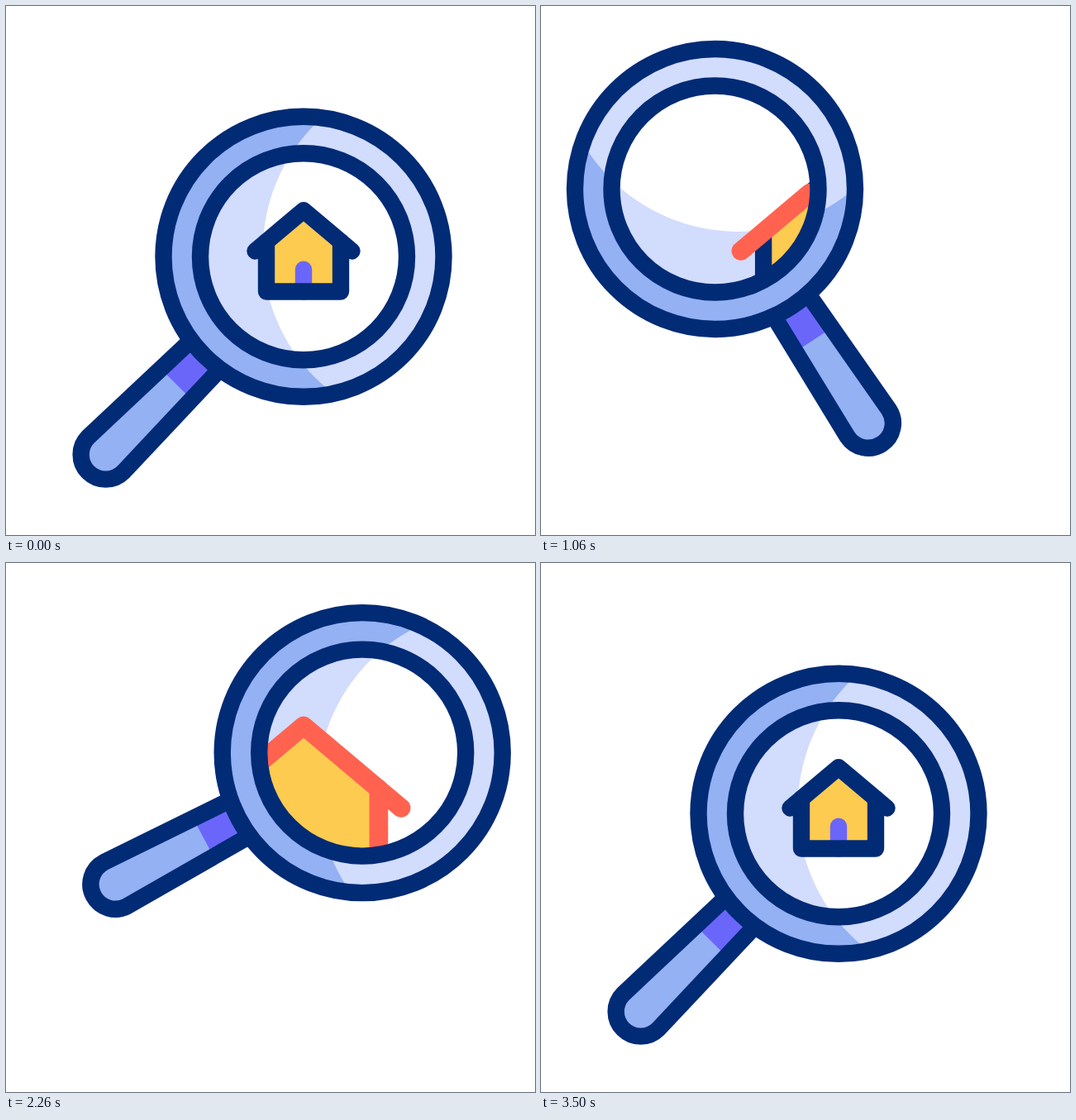
Recreate the animation shown at these times as an HTML page. Size 640x640 px, loop 3600 ms.

```html
<!DOCTYPE html>
<html lang="en">
<head>
<meta charset="utf-8">
<title>House search</title>
<style>
  html, body { margin: 0; width: 100%; height: 100%; overflow: hidden; background: #fff; }
  svg { display: block; width: 100vw; height: 100vh; }
  .line { fill: none; stroke: #022b76; stroke-width: 20.4; stroke-linecap: round; stroke-linejoin: round; }
  .hot .line { stroke: #ff6350; stroke-width: 22.7; }
  .mid { fill: #93b1f3; }
  .pale { fill: #d2dcfd; }
  .violet { fill: #6b66fa; }
</style>
</head>
<body>
<svg viewBox="0 0 640 640">
  <defs>
    <clipPath id="lens"><circle id="hole" r="120"/></clipPath>
    <clipPath id="shine"><circle cx="168.2" cy="-7" r="217.5"/></clipPath>
    <path class="route" d="M360 303.3C340 236.3 260 192.3 210.5 221.5"/>
    <path class="route" d="M210.5 221.5C280.5 158 380.5 247 441 219.5"/>
    <path class="route" d="M441 219.5L360 303.3"/>
  </defs>

  <g id="glass">
    <g transform="rotate(135)">
      <path class="mid" d="M165 -24.6L338.5 -30A30 30 0 0 1 338.5 30L165 24.6Z"/>
      <path class="violet" d="M165 -24.6L218 -26.2V26.2L165 24.6Z"/>
      <path class="line" d="M165 -24.6L338.5 -30A30 30 0 0 1 338.5 30L165 24.6"/>
    </g>
    <circle class="mid" r="170"/>
    <circle class="pale" r="170" clip-path="url(#shine)"/>
    <circle class="pale" r="125"/>
    <circle fill="#fff" r="125" clip-path="url(#shine)"/>
  </g>

  <g clip-path="url(#lens)">
    <g transform="translate(360 296.5)">
      <path class="body" fill="#fccb50"/>
      <path class="door line" style="stroke:#6b66fa"/>
      <path class="walls line"/>
      <path class="roof line"/>
      <g class="hot" id="hot">
        <path class="door line" pathLength="1"/>
        <path class="walls line" pathLength="1"/>
        <path class="roof line" pathLength="1"/>
      </g>
    </g>
  </g>

  <g id="rims">
    <circle class="line" r="169.5"/>
    <circle class="line" r="125"/>
  </g>
</svg>

<script>
const LOOP = 3600;
const $ = id => document.getElementById(id);
const all = sel => [...document.querySelectorAll(sel)];

const clamp = v => Math.min(1, Math.max(0, v));
const span = (t, a, b) => clamp((t - a) / (b - a));
const smooth = s => s * s * (3 - 2 * s);
const sine = s => (1 - Math.cos(Math.PI * s)) / 2;

// cubic-bezier(.33, 0, .55, 1)
function glide(s) {
  let lo = 0, hi = 1;
  for (let i = 0; i < 24; i++) {
    const u = (lo + hi) / 2, v = 1 - u;
    if (0.99 * u * v * v + 1.65 * u * u * v + u * u * u < s) lo = u; else hi = u;
  }
  return smooth(lo);
}

const routes = all('.route').map(el => ({ el, len: el.getTotalLength() }));
const moves = [
  { from: 127, to: 860, a: 0, b: -78.2, ease: glide, turn: smooth },
  { from: 1067, to: 1900, a: -78.2, b: 19.3, ease: glide, turn: smooth },
  { from: 2035, to: 3035, a: 19.3, b: 0, ease: sine, turn: sine }
];

function pose(t) {
  let i = moves.length - 1;
  while (i > 0 && t < moves[i].from) i--;
  const m = moves[i], s = span(t, m.from, m.to);
  const p = routes[i].el.getPointAtLength(routes[i].len * m.ease(s));
  return { x: p.x, y: p.y, turn: m.a + (m.b - m.a) * m.turn(s) };
}

// The house grows while its line weight stays the same.
const line = (pts, k) => 'M' + pts.map(([x, y]) => `${x * k} ${y * k}`).join('L');
const eave = -11.4, base = 49, peak = -49.3;
const shapes = {
  body: [[-45, eave], [0, peak], [45, eave], [45, base], [-45, base]],
  door: [[0, 22.3], [0, base]],
  walls: [[45, eave], [45, base], [-45, base], [-45, eave]],
  roof: [[-58.5, 0], [0, peak], [58.5, 0]]
};
const parts = Object.keys(shapes).map(name => ({ pts: shapes[name], els: all('.' + name) }));

function trim(name, p) {
  const el = document.querySelector('#hot .' + name);
  el.style.display = p > 0 ? '' : 'none';
  el.setAttribute('stroke-dasharray', p < 1 ? `${p} 2` : 'none');
}

function draw(t) {
  const { x, y, turn } = pose(t);
  $('glass').setAttribute('transform', `translate(${x} ${y}) rotate(${turn})`);
  $('rims').setAttribute('transform', `translate(${x} ${y})`);
  $('hole').setAttribute('cx', x);
  $('hole').setAttribute('cy', y);

  const k = 1 + 1.02 * (smooth(span(t, 133, 400)) - smooth(span(t, 2767, 3033)));
  for (const { pts, els } of parts) {
    const d = line(pts, k);
    els.forEach(el => el.setAttribute('d', d));
  }

  trim('roof', smooth(span(t, 780, 1480)));
  trim('walls', smooth(span(t, 1300, 1880)));
  trim('door', smooth(span(t, 1350, 1700)));
  $('hot').setAttribute('opacity', 1 - span(t, 3300, 3500));
}

const start = performance.now();
function tick() {
  draw((performance.now() - start) % LOOP);
  requestAnimationFrame(tick);
}
tick();
</script>
</body>
</html>
```
